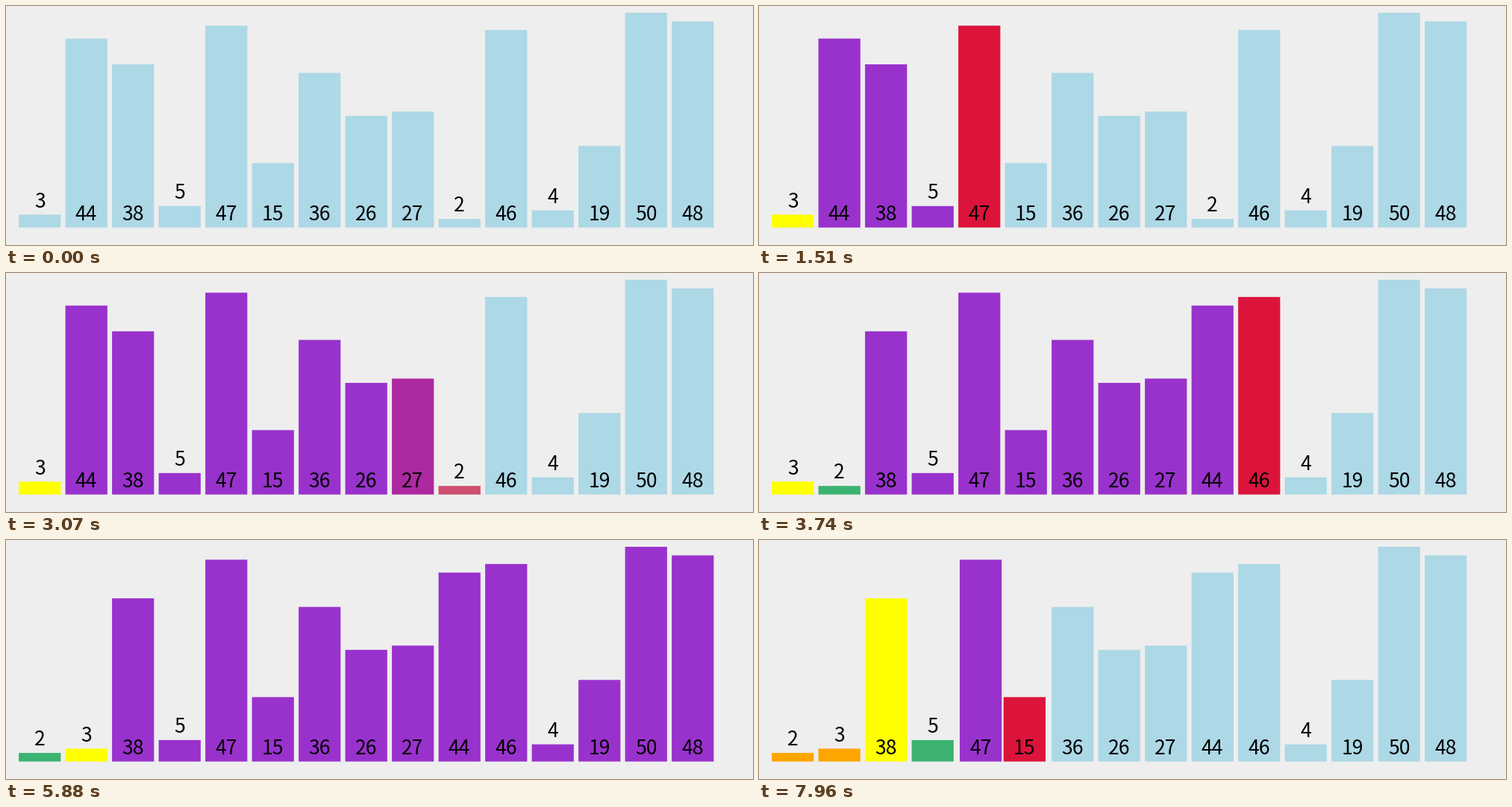
These frames come from a looping animation (1001x320 px, 8 s). A matplotlib script:

```python
import numpy as np
import matplotlib.pyplot as plt
from matplotlib.animation import FuncAnimation
from matplotlib.colors import to_rgb
from matplotlib.patches import Rectangle

W, H, DPI = 1001, 320, 100
LOOP, TICK = 8000, 20

VALUES = [3, 44, 38, 5, 47, 15, 36, 26, 27, 2, 46, 4, 19, 50, 48]
N = len(VALUES)
LEFT, PITCH, BAR_W = 17.1, 62.5, 56.25
FLOOR, UNIT = 296.6, 5.75
LABEL_GAP, FONT_PX = 9.7, 26.6

BASE, PIVOT, TEST = "lightblue", "yellow", "crimson"
HIGH, LOW, DONE = "darkorchid", "mediumseagreen", "orange"


def tint(times, colors, first=0.5):
    """Blend the bars at the given slots to new colours."""
    fractions = (first, 1) if len(times) > 1 else (1,)
    return times, fractions, colors, None


def advance(times, slot, first=0.5):
    """Mark a slot as larger than the pivot and test the next one."""
    return tint(times, {slot: HIGH, slot + 1: TEST}, first)


def swap(times, a, b):
    return times, (0.03, 0.8, 1), {}, (a, b)


STEPS = [
    # first partition, pivot 3
    tint((120, 240), {0: PIVOT}),
    tint((440, 560), {1: TEST}),
    advance((880, 990), 1),
    advance((1090, 1190), 2),
    advance((1390, 1510), 3),
    advance((1850, 1960), 4),
    advance((2070, 2180), 5),
    advance((2290, 2410), 6),
    advance((2730, 2850), 7),
    advance((3070, 3190), 8, 0.7),
    swap((3300, 3410, 3530), 1, 9),
    tint((3740,), {1: LOW, 10: TEST}),
    advance((4070, 4180), 10),
    advance((4300, 4410), 11),
    advance((4750,), 12),
    advance((5100, 5210), 13),
    tint((5320, 5420), {14: HIGH}),
    swap((5660, 5770, 5880), 0, 1),
    tint((6100, 6210), {**dict.fromkeys(range(N), BASE), 1: DONE}),
    tint((6320, 6420), {0: DONE}),
    # second partition, pivot 38
    tint((6680, 6750), {2: PIVOT}, 0.17),
    tint((7060, 7180), {3: TEST}),
    tint((7290, 7400), {3: LOW, 4: TEST}),
    advance((7620, 7720), 4),
    swap((7960, 8070, 8180), 4, 5),
]


def pose(t):
    """Slot position and colour of every bar at time t."""
    order = list(range(N))
    slots = np.arange(N, dtype=float)
    colors = np.array([to_rgb(BASE)] * N)
    for times, fractions, changes, pair in STEPS:
        if t < times[0]:
            break
        f = [part for start, part in zip(times, fractions) if start <= t][-1]
        for slot, name in changes.items():
            bar = order[slot]
            colors[bar] += f * (np.array(to_rgb(name)) - colors[bar])
        if pair:
            a, b = pair
            slots[order[a]] = a + f * (b - a)
            slots[order[b]] = b + f * (a - b)
            order[a], order[b] = order[b], order[a]
    return slots, colors


fig = plt.figure(figsize=(W / DPI, H / DPI), dpi=DPI, facecolor="#eeeeee")
ax = fig.add_axes([0, 0, 1, 1])
ax.set(xlim=(0, W), ylim=(H, 0))
ax.axis("off")

bars, labels = [], []
for value in VALUES:
    top = FLOOR - value * UNIT
    bar = Rectangle((0, top), BAR_W, value * UNIT, lw=0, snap=False)
    bars.append(ax.add_patch(bar))
    base = top if value < 10 else FLOOR
    labels.append(ax.text(0, base - LABEL_GAP, str(value), color="black",
                          family="Noto Sans CJK JP", size=FONT_PX * 72 / DPI,
                          ha="center", va="baseline", zorder=5))


def draw(i):
    slots, colors = pose(i * TICK + TICK / 2)
    for bar, label, slot, color in zip(bars, labels, slots, colors):
        x = LEFT + PITCH * slot
        bar.set_x(x)
        bar.set_facecolor(color)
        label.set_x(x + BAR_W / 2)
    return bars + labels


anim = FuncAnimation(fig, draw, frames=LOOP // TICK, interval=TICK,
                     init_func=lambda: draw(0), repeat=True, repeat_delay=0)
plt.show()
```
